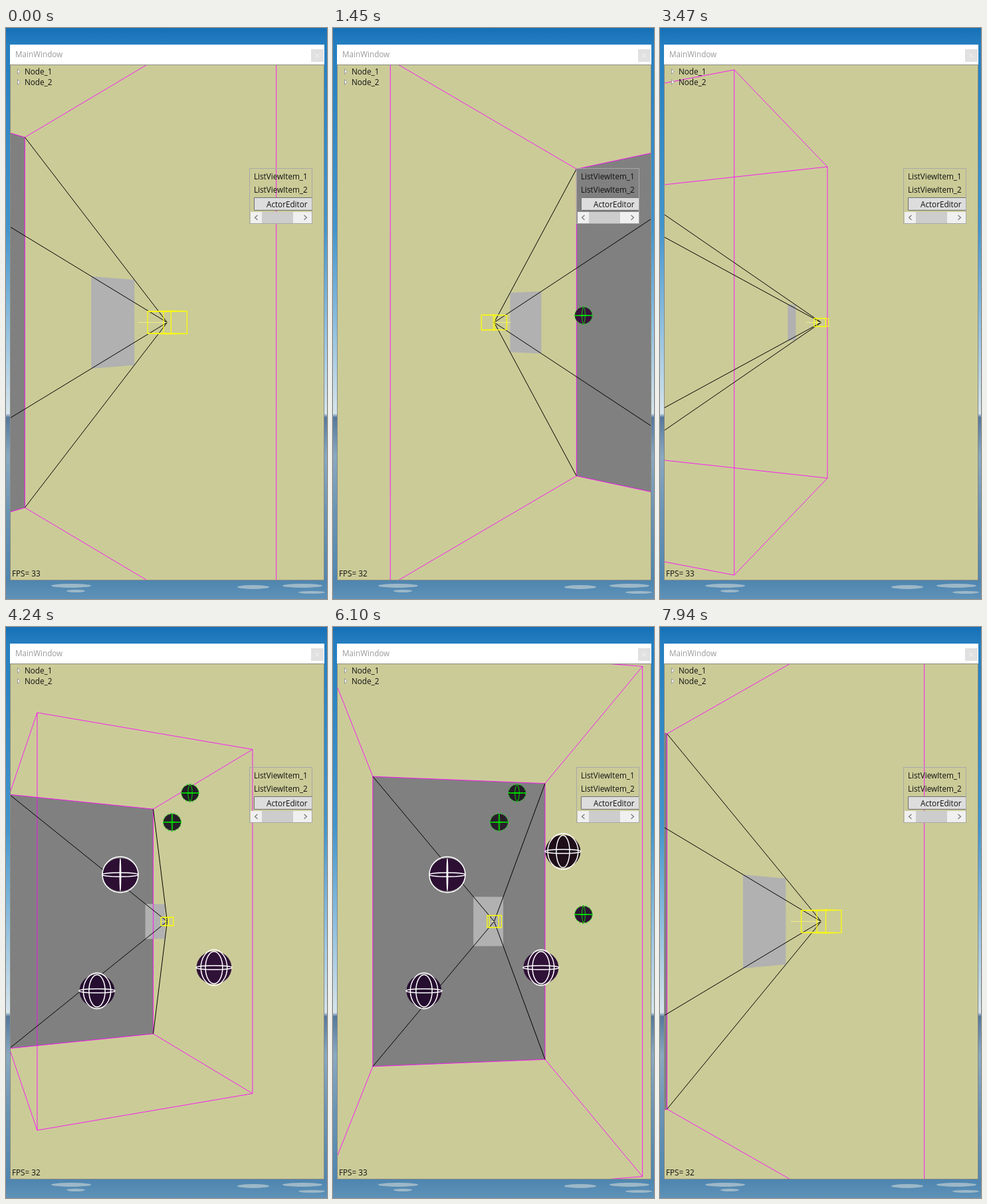
Animation of 483 by 860 pixels, one loop 8000 ms. Source, as an HTML page with a canvas:

```html
<!DOCTYPE html>
<html lang="en">
<head>
<meta charset="utf-8">
<title>Frustum viewer</title>
<style>
  html, body { margin: 0; width: 100%; height: 100%; overflow: hidden; }
  canvas { display: block; }
</style>
</head>
<body>
<canvas id="stage" width="483" height="860"></canvas>
<script>
const ctx = document.getElementById('stage').getContext('2d');
const LOOP = 8000, STEP = 77.1, RAD = Math.PI / 180;
const FOCAL = 705, CX = 242.5, CY = 443.5;
const NEAR = 0.08, FAR = 0.866, HALF_W = 0.304, HALF_H = 0.5;
const FONT = '11.7px "Open Sans", "Noto Sans", sans-serif';

// Screen position, depth, radius, ring turn in degrees, lit and unlit colour
const heads = [
  { x: 277, y: 250, z: 1.66, r: 13.5, turn: 20, lit: [225, 215, 200], dark: [35, 28, 38] },
  { x: 250, y: 294, z: 1.66, r: 13.5, turn: 5, lit: [225, 40, 215], dark: [40, 30, 42] },
  { x: 172, y: 373, z: 1.65, r: 27, turn: 2, lit: [140, 12, 140], dark: [45, 15, 52] },
  { x: 346, y: 338, z: 1.58, r: 27, turn: 32, lit: [135, 75, 115], dark: [30, 15, 25] },
  { x: 377, y: 433, z: 1.4, r: 13.5, turn: 15, lit: [60, 14, 62], dark: [45, 18, 50] },
  { x: 313, y: 513, z: 1.5, r: 27, turn: 43, lit: [62, 22, 62], dark: [48, 18, 56] },
  { x: 137, y: 548, z: 1.65, r: 27, turn: 40, lit: [58, 12, 62], dark: [38, 14, 48] }
];

// Yaw and distance of the moving camera at time t in seconds
function poseAt(t) {
  const x = 45 * t * RAD, phase = 90.4 * (t - 1.285) * RAD;
  const yaw = (-19.65 + 55.8 * Math.cos(phase) - 0.4 * Math.sin(phase) + Math.cos(2 * phase)
    + 0.45 * Math.cos(3 * phase) + 1.5 * Math.sin(x)) * RAD;
  const dist = 0.807 - 0.3807 * Math.cos(x) + 0.008 * Math.sin(x)
    + 0.004 * Math.cos(2 * x) + 0.03 * Math.sin(3 * x);
  return { sin: Math.sin(yaw), cos: Math.cos(yaw), dist };
}

function project(p, [x, y, z]) {
  const scale = FOCAL / (z * p.cos - x * p.sin + p.dist);
  return [CX + (x * p.cos + z * p.sin) * scale, CY + y * scale];
}

function rect(x, y, w, h, fill, border) {
  ctx.fillStyle = fill;
  ctx.fillRect(x, y, w, h);
  if (!border) return;
  ctx.strokeStyle = border;
  ctx.lineWidth = 1;
  ctx.strokeRect(x + 0.5, y + 0.5, w - 1, h - 1);
}

function trace(points, close) {
  ctx.beginPath();
  points.forEach(q => ctx.lineTo(...q));
  if (close) ctx.closePath();
}

function line(points, color, width = 1, close = false) {
  trace(points, close);
  ctx.strokeStyle = color;
  ctx.lineWidth = width;
  ctx.stroke();
}

function polygon(points, color) {
  trace(points, true);
  ctx.fillStyle = color;
  ctx.fill();
}

function ellipse(x, y, rx, ry) {
  ctx.beginPath();
  ctx.ellipse(x, y, rx, ry, 0, 0, 2 * Math.PI);
}

function text(s, x, y, color = '#111') {
  ctx.fillStyle = color;
  ctx.fillText(s, x, y);
}

const face = (w, h, z) => [[-w, -h, z], [w, -h, z], [w, h, z], [-w, h, z]];

function wireBox(p, w, h, z0, z1, color, width) {
  const back = face(w, h, z0).map(q => project(p, q));
  const front = face(w, h, z1).map(q => project(p, q));
  line(back, color, width, true);
  line(front, color, width, true);
  back.forEach((q, i) => line([q, front[i]], color, width));
}

function drawDesktop() {
  const sky = ctx.createLinearGradient(0, 0, 0, 860);
  [[0, '#1670b6'], [0.03, '#257fc0'], [0.35, '#4295cd'], [0.52, '#8fbfdf'], [0.675, '#d6e4eb'],
   [0.682, '#55789b'], [0.75, '#8aa9c1'], [0.85, '#6a94b4'], [0.97, '#4f86b0'], [1, '#5f92b8']]
    .forEach(s => sky.addColorStop(...s));
  rect(0, 0, 483, 860, sky);
  ctx.fillStyle = '#9db8c8';
  [[98, 840, 30, 3], [105, 848, 14, 2], [372, 842, 24, 3], [446, 840, 30, 3], [460, 850, 20, 2]]
    .forEach(c => { ellipse(...c); ctx.fill(); });
}

function drawFrustum(p) {
  const far = face(HALF_W, HALF_H, FAR).map(q => project(p, q));
  const ratio = NEAR / FAR;
  polygon(far, '#808080');
  polygon(face(HALF_W * ratio, HALF_H * ratio, NEAR).map(q => project(p, q)), '#b1b1b1');
  wireBox(p, HALF_W, HALF_H, NEAR, FAR, '#f0f', 0.85);
  far.forEach(q => line([[CX, CY], q], '#000'));
  line([[CX, CY], project(p, [0, 0, 0.041])], '#f2ee88');
  wireBox(p, 0.0102, 0.0102, -0.0155, 0.0155, '#ff0', 1.2);
}

function isInside(p, head) {
  const x = (head.x - CX) * head.z / FOCAL, depth = head.z - p.dist;
  const side = x * p.cos - depth * p.sin;
  const ahead = x * p.sin + depth * p.cos;
  return side > -0.25 && side < 0.35 && ahead > 0.13 && ahead < 0.9;
}

function drawHead({ x, y, r, turn, lit, dark }, light) {
  const big = r > 20;
  const mix = dark.map((d, i) => Math.round(d + (lit[i] - d) * light));
  ctx.fillStyle = `rgb(${mix})`;
  ellipse(x, y, r * 0.98, r * 0.92);
  ctx.fill();
  ctx.strokeStyle = big ? '#fff' : '#0d0';
  ctx.lineWidth = big ? 1.5 : 1;
  const c = Math.cos(turn * RAD), s = Math.sin(turn * RAD);
  if (!big) ctx.setLineDash([3, 2]);
  ellipse(x, y, r * c, r);
  ctx.stroke();
  ctx.setLineDash([]);
  ellipse(x, y, r, big ? 3 : 0.5);
  ctx.stroke();
  ellipse(x, y, r * s * 0.7, r * 0.9);
  ctx.stroke();
}

function drawPanel() {
  ctx.strokeStyle = '#a8a8a8';
  ctx.lineWidth = 1;
  ctx.strokeRect(366.5, 211.5, 94, 83);
  text('ListViewItem_1', 373, 228);
  text('ListViewItem_2', 373, 248);
  rect(373, 255, 87, 20, '#ddd');
  line([[460, 255.5], [373.5, 255.5], [373.5, 274.5], [460, 274.5]], '#707070');
  text('ActorEditor', 392, 270);
  rect(368, 277, 92, 17, '#f0f0f0');
  rect(385, 277, 47, 17, '#cdcdcd');
  line([[378.5, 282], [374.5, 285.5], [378.5, 289]], '#777', 1.2);
  line([[448.5, 282], [452.5, 285.5], [448.5, 289]], '#777', 1.2);
}

function drawTree() {
  ['Node_1', 'Node_2'].forEach((name, i) => {
    const y = 65.5 + 16 * i, arrow = [[17.5, y - 4], [21, y], [17.5, y + 4]];
    polygon(arrow, '#fff');
    line(arrow, '#999', 1, true);
    text(name, 28, y + 4.5);
  });
}

function draw(ms) {
  const t = Math.floor(ms / STEP + 0.35) * STEP / 1000;
  const p = poseAt(t);
  ctx.font = FONT;

  drawDesktop();
  rect(6, 25, 473, 31, '#fff');
  text('MainWindow', 14, 44, '#999');
  rect(459, 32, 19, 19, '#e1e1e1');
  line([[465.5, 38.5], [471.5, 44.5]], '#f6f6f6');
  line([[471.5, 38.5], [465.5, 44.5]], '#f6f6f6');
  rect(6, 55, 473, 777, '#cbcb98', '#8b8b80');

  ctx.save();
  ctx.beginPath();
  ctx.rect(7, 56, 471, 775);
  ctx.clip();
  drawFrustum(p);
  const light = Math.max(0, Math.sin(2 * Math.PI * ms / LOOP));
  heads.filter(h => isInside(p, h)).forEach(h => drawHead(h, light));
  drawTree();
  drawPanel();
  text('FPS= ' + (33 - Math.floor(ms / 1400) % 2), 9, 826);
  ctx.restore();
}

function tick() {
  draw(performance.now() % LOOP);
  requestAnimationFrame(tick);
}
tick();
</script>
</body>
</html>
```
